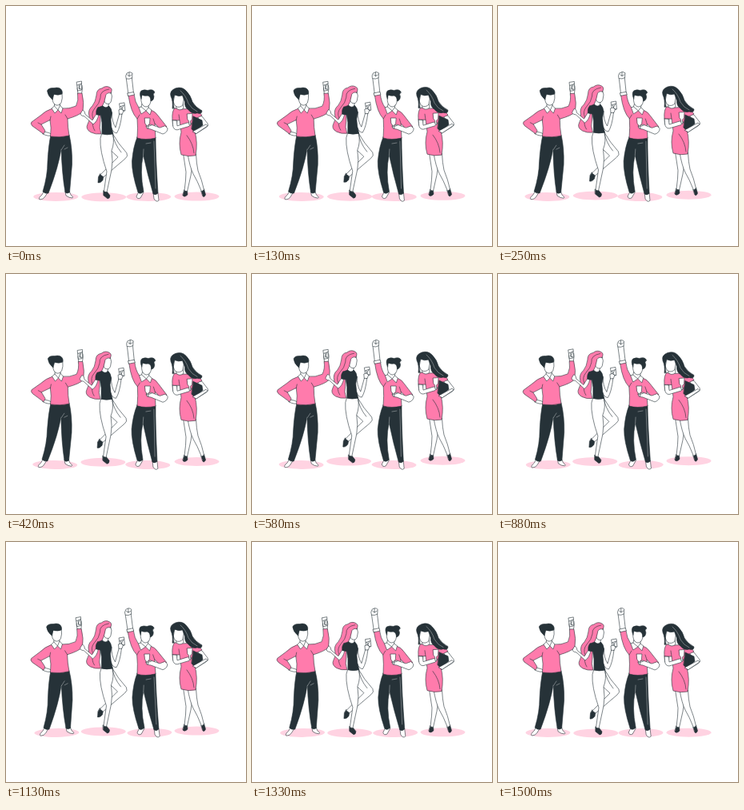
These frames come from a looping animation (300 by 300 pixels, 1.54 s). An HTML page:

```html
<!DOCTYPE html>
<html lang="en">
<head>
<meta charset="utf-8">
<title>Party</title>
<style>
html, body { margin: 0; width: 100%; height: 100%; overflow: hidden; background: #fff; }
svg { display: block; width: 100vw; height: 100vh; }
path { stroke: #263238; stroke-width: .6; stroke-linejoin: round; stroke-linecap: round; }
.w { fill: #fff; }
.p { fill: #ff7bac; }
.d { fill: #263238; }
.l { fill: none; }
.hi { fill: none; stroke: #fff; stroke-width: .35; }
ellipse { fill: #ffd3e2; }
</style>
</head>
<body>
<svg viewBox="0 0 300 300">
  <g id="man1">
    <ellipse cx="62.3" cy="238.4" rx="28" ry="5.5"/>
    <path class="w" d="M47 232 L45 236 Q40 240 42 242 Q47 242 49 238 L52 233Z"/>
    <path class="w" d="M74 232 L75 237 Q79 240 83 240 Q85 239 81 236 L79 231Z"/>
    <path class="d" d="M56 161 L79 161 Q83 178 82.5 198 L79.5 233 Q76 235 74 233 Q70 210 69 178 Q66 200 53 234 Q49 235 46 232 Q52 212 52 195 Q53 175 56 161Z"/>
    <path class="hi" d="M69 180 L73 174 M73 179 L77 177"/>
    <path class="w" d="M47 157 Q55 158 58 161 Q54 164 46 160Z"/>
    <path class="w" d="M90 110 L89 103 Q90 98 95 99 L95.5 103 L94.5 110Z"/>
    <path class="w" d="M88.5 95 L94.5 94 L94.5 105 L90 106Z"/>
    <path class="l" d="M89.2 99 L94.5 97 M91 99 L92 104 M93 98 L91 103 L94 104"/>
    <path class="p" d="M58 128 Q49 131 43 137 L32 145 Q30 147 33 150 L47 160 L49 156 L44 148 L55 142.5 Q57 152 55.5 163 Q68 165 79 162 Q77 151 77 141 Q91 137 96 132 Q98 121 95 109 L89.5 109 Q91 118 87.5 125 Q79 129 70 128Z"/>
    <path class="l" d="M55 143 L56 138 M77 141 L74 136 M44 148 L40 146"/>
    <path class="w" d="M60.5 119 L60.5 125 L57 128 L61 134 L65 130 L69 134 L71 128 L67.5 124 L67.5 119Z"/>
    <path class="l" d="M60.5 125 L65 130 L67.5 124"/>
    <path class="w" d="M58 110 Q57 120 61 123 Q65 126 69 121 Q71 116 70 108 L62 108Z"/>
    <path class="d" d="M58 117 Q52 112 51.5 106 Q53 102 60 102.5 Q67 101 69.5 105 Q71 107 70 110 Q66 112 60 110.5Z"/>
  </g>

  <g id="woman1">
    <ellipse cx="122.3" cy="239" rx="28" ry="5.5"/>
    <path class="d" d="M122 231 L126 232 L130 237 Q130 241 127 241 L122 237Z"/>
    <path class="d" d="M118 210 L122 213 L121 218 Q118 222 115 221 L115.5 214Z"/>
    <path class="w" d="M126 160 L133.5 160 Q140 172 151 184 Q153 188 149 191 L122 214 L118 211 L140 189 L126 176Z"/>
    <path class="w" d="M120 160 L133.5 160 Q136 171 132 181 Q134 194 132 205 L126 233 L122.5 232 L126 207 Q117 181 118 166Z"/>
    <path class="l" d="M133.5 160 Q135 172 144 183"/>
    <path class="w" d="M121 119 L120 127 L127 129 L129 120Z"/>
    <path class="w" d="M122 108 Q121 119 125 122 Q130 124 131.5 119 L132.5 113 L131 107Z"/>
    <path class="p" d="M131 109 Q134 104 130 102 Q125 99 120 103 Q113 104 113 112 Q112 120 108 125 Q102 130 104 138 Q105 143 102 148 Q99 154 106 158 Q112 161 119 160 Q116 152 118 145 L118 130 Q124 120 125 111 Q127 108 131 109Z"/>
    <path class="l" d="M129 104 Q117 106 118 115 Q117 122 111 128 Q106 134 109 141 Q107 150 111 156"/>
    <path class="w" d="M116 136 Q114 145 109 148 L98 138 Q92 137 93.5 134 L96 130 Q99 132 99 135.5 L108 143 L113 135Z"/>
    <path class="w" d="M129 133 L132.5 133 Q132 144 137 152 L142 134 L145 135 Q143 152 138.5 159 Q134 159 131.5 152Z"/>
    <path class="d" d="M115 127 L121 125 Q125 129 128.5 125 Q132 128 132.5 134 L131 142 Q131 151 134 160 Q126 162 120 160 L120 146 L118.5 137 L113 136 Q112 130 115 127Z"/>
    <path class="w" d="M142 122 L148 121 L149 131 L143.5 132Z"/>
    <path class="l" d="M142.5 126 L148 124 M144 126 L146 131 M147 125 L144 130 L148 131"/>
    <path class="w" d="M141.5 135 L141 130 L144 129 L147 131 L145.5 135Z"/>
  </g>

  <g id="man2">
    <ellipse cx="178.3" cy="238.5" rx="28" ry="5.5"/>
    <path class="w" d="M166 232 L163 238 Q164 242 168 240 L172 233Z"/>
    <path class="w" d="M184 233 L185 241 Q188 246 191 243 L190 234Z"/>
    <path class="d" d="M164 164 L187 164 Q187 187 190 234 Q187 237 184 235 Q177 211 171.5 186 Q167 207 172 232 Q168 236 165 233 Q157 208 157.5 194 Q159 176 164 164Z"/>
    <path class="hi" d="M185 169 L187 228 M171.5 187 L172 179 M175 172 L181 171"/>
    <path class="w" d="M153 111 L150.5 92 Q148.5 87 151 84 Q155 81 158 84 L157.5 91 L159.5 109Z"/>
    <path class="l" d="M150.5 91 Q154 92 157.5 90 M151.5 86 Q154 89 157 86 M154 83 L154 88"/>
    <path class="p" d="M153 112 L160 110 Q161 120 166 127 Q175 130 181 130 Q187 132 190 137 L201 151 L194 155 L186 147 L187 165 Q174 168 164 165 Q165 152 164 141 Q156 133 153 112Z"/>
    <path class="w" d="M152 109 L159.5 107.5 L160.5 111 L153 112.5Z"/>
    <path class="l" d="M186 147 L184 141 M164 141 L167 136"/>
    <path class="w" d="M199 150 L202 153 Q202 158 196 160 L181 154 Q176 154 175 150 L181 148 L192 152Z"/>
    <path class="w" d="M170 122 L169 126 L166 127 L169 135 L175 131 L180 136 L182 130 L178 127 L179 122Z"/>
    <path class="l" d="M169 126 L175 131 L178 127"/>
    <path class="w" d="M169 112 Q168 120 171 124 Q175 128 179 124 Q182 120 181 112Z"/>
    <path class="d" d="M169 116 Q166 109 169 106 Q173 104 177 105.5 Q184 103 186 108 Q183 110 185 113 Q185 118 181 119 Q181 113 177 112 Q173 113 170 111Z"/>
    <path class="w" d="M173.5 140 L180 140 L179.5 147 L177.5 149 L178 153 L176 153 L175.5 149 L174 147Z"/>
    <path class="l" d="M175 150 Q179 151 182 149"/>
  </g>

  <g id="woman2">
    <ellipse cx="238.5" cy="238.2" rx="28" ry="5.5"/>
    <path class="d" d="M223 230 L226.5 231 L227 236 Q223 240 221 237Z"/>
    <path class="d" d="M244 231 L247.5 229 L249.5 236 Q248 240 246 238Z"/>
    <path class="w" d="M222 185 L233 185 Q233 202 231 212 L226.5 232 L223 231 Q225 217 225 208Z"/>
    <path class="w" d="M227 185 L237.5 185 Q238 197 240 206 Q245 218 247.5 230 L244.5 232 Q239 218 234 210 Q230 202 227 185Z"/>
    <path class="w" d="M239 137 L245 138 L252 147 Q254 150 250 152 L237 160 L233 158 L244 149Z"/>
    <path class="w" d="M208.5 142 L214 143 L213 150 L209 150Z"/>
    <path class="p" d="M211 128 Q222 130 230 128 Q238 128 241 132 L245 137 L237 141 Q234 147 236 157 Q240 171 237 187 Q228 189 219 186 Q215 172 219 158 L217 143 L208 143 Q207 131 211 128Z"/>
    <path class="l" d="M217 143 L216 136 M226 162 Q234 172 235 184"/>
    <path class="w" d="M208.5 143 L213.5 143.5 L214 150 L227 146 L232 147 L229 150.5 L214 155 Q209 155 208.5 149Z"/>
    <path class="d" d="M234 138 L245 143 L246 149 L236 158 L232 154Z"/>
    <path class="w" d="M233.5 157 L250 148 L252 150 L238 159.5Z"/>
    <path class="w" d="M213 121 L213 128 Q217 132 222 128 L221 120Z"/>
    <path class="w" d="M209 112 Q208 121 212 125.5 Q217 128 221 124 L223 112Z"/>
    <path class="d" d="M208 128 Q209 119 206 113 Q204 106 212 103 Q220 100.5 225 106 Q231 112 233 120 Q237 127 245 131 Q245 136 239 134 Q233 136 228 130 Q223 127 223.5 120 L220.5 112 Q215 114 211 111 Q208 119 210 128Z"/>
    <path class="hi" d="M218 106 Q225 112 228 122 Q232 129 239 132"/>
    <path class="w" d="M226.5 135 L233 134.5 L232.5 142 L230.5 144 L231 149 L229 149 L228.5 144 L227 142Z"/>
  </g>
</svg>
<script>
const LOOP = 1540;
const STEPS = 37;
const TURN = 2 * Math.PI;
const place = (id, transform) =>
  document.getElementById(id).setAttribute('transform', transform);

function draw(now) {
  const phase = Math.floor((now % LOOP) / LOOP * STEPS + 0.05) / STEPS;
  const tilt = 0.85 * Math.sin(TURN * phase);
  const lift = (1 - Math.cos(TURN * (phase + 0.05))) / 2;
  place('man1', `rotate(${tilt} 62 165)`);
  place('man2', `rotate(${tilt} 176 165)`);
  place('woman1', `translate(${-1.3 * lift} ${-5.2 * lift})`);
  place('woman2', `translate(0 ${-5.2 * lift})`);
}

const start = performance.now();
function tick() {
  draw(performance.now() - start);
  requestAnimationFrame(tick);
}
tick();
</script>
</body>
</html>
```
